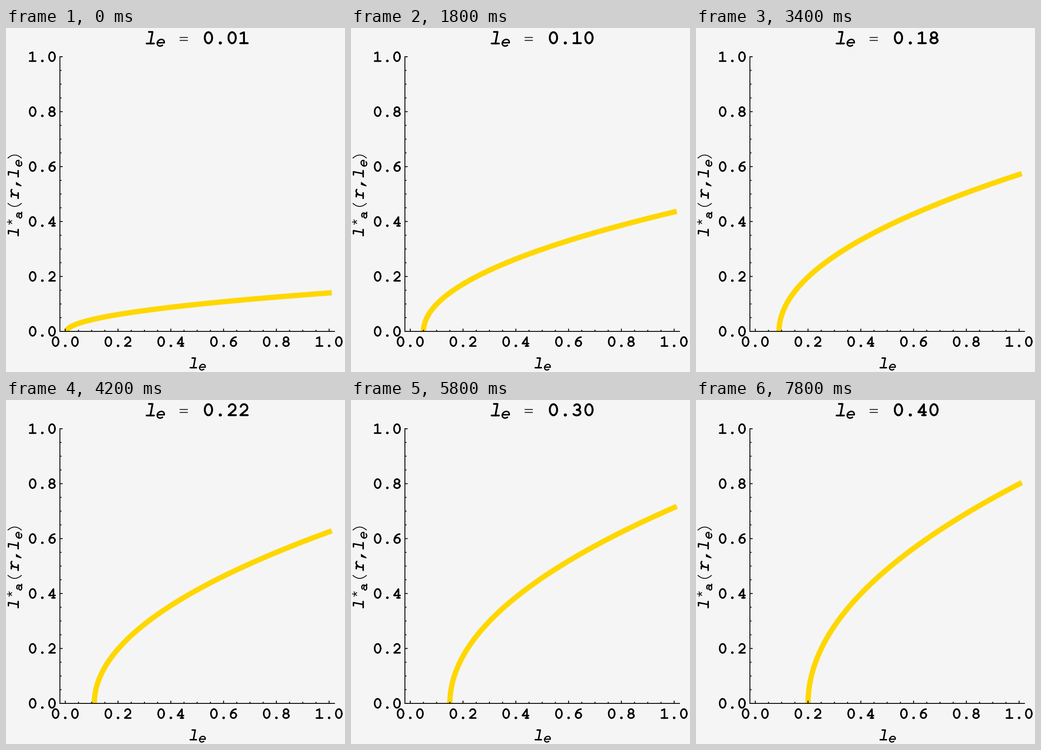
A matplotlib script that plays this animation: 742x754 px, repeating every 8 s.

```python
import numpy as np
import matplotlib.pyplot as plt
from matplotlib.animation import FuncAnimation
from matplotlib.patches import Polygon

W, H, DPI = 742, 754, 100
PT = 72 / DPI
FRAMES, INTERVAL = 40, 200
X0, XS = 129.7, 577.6
Y0, YS = 665.0, 602.0
AXIS_X = 118
CURVE_Y0 = 665.6
R_MAX = 1.01
BG, GOLD = "#f5f5f5", "#ffd700"
GAP = [(np.nan, np.nan)]

fig = plt.figure(figsize=(W / DPI, H / DPI), dpi=DPI, facecolor=BG)
ax = fig.add_axes([0, 0, 1, 1])
ax.set_xlim(0, W)
ax.set_ylim(H, 0)
ax.axis("off")


def line(xs, ys, width=1.9, cap="butt", color="black", z=3):
    return ax.plot(xs, ys, color=color, lw=width * PT, solid_capstyle=cap,
                   solid_joinstyle="round", snap=False, zorder=z)[0]


def arc(cx, cy, rx, ry, start=0, end=360):
    t = np.radians(np.linspace(start, end, 48))
    return list(zip(cx + rx * np.cos(t), cy + ry * np.sin(t)))


# Pen strokes of the digits, in em, centred on x = 0 above the baseline.
SIX = arc(0.01, 0.215, 0.175, 0.17) + GAP + arc(0.17, 0.215, 0.335, 0.385, 90, 180)
DIGITS = {
    "0": arc(0, 0.325, 0.185, 0.28),
    "1": [(-0.17, 0.53), (0, 0.6), (0, 0.05)] + GAP + [(-0.19, 0.05), (0.19, 0.05)],
    "2": arc(0, 0.43, 0.17, 0.175, 165, -35) + [(-0.18, 0.05), (0.19, 0.05)],
    "3": arc(-0.01, 0.46, 0.155, 0.14, 150, -90) + arc(-0.02, 0.18, 0.19, 0.14, 90, -150),
    "4": [(0.09, 0.05), (0.09, 0.6), (-0.19, 0.2), (0.19, 0.2)]
         + GAP + [(0, 0.05), (0.18, 0.05)],
    "5": [(0.15, 0.6), (-0.14, 0.6), (-0.14, 0.34)]
         + arc(-0.01, 0.225, 0.19, 0.18, 130, -145),
    "6": SIX,
    "7": [(-0.17, 0.5), (-0.17, 0.6), (0.17, 0.6), (0.17, 0.55), (-0.02, 0.05)],
    "8": arc(0, 0.465, 0.15, 0.14) + GAP + arc(0, 0.185, 0.18, 0.14),
    "9": [(-x, 0.65 - y) for x, y in SIX],
    ".": arc(0, 0.06, 0.03, 0.03),
}


def number_strokes(text, cx, base, size):
    pts = []
    for i, ch in enumerate(text):
        shift = 0.6 * (i - (len(text) - 1) / 2)
        pts += [(x + shift, y) for x, y in DIGITS[ch]] + GAP
    u, v = np.array(pts).T
    return cx + size * u, base - size * v


def number(text, cx, base, size):
    return line(*number_strokes(text, cx, base, size), 0.097 * size, "round", z=4)


def stroke(pts, x, base, width, up=False):
    """Draw a pen stroke in text coordinates, optionally running upwards."""
    u, v = np.array(pts, float).T
    if up:
        line(base - v, x - u, width, "round")
    else:
        line(x + u, base - v, width, "round")


def letter_l(x, base, h, width, up=False):
    stem = [(0.2 * h, h), (0.52 * h, h), (0.33 * h, 0)]
    stroke([(0, 0), (0.64 * h, 0)] + GAP + stem, x, base, width, up)


def letter_e(x, base, w, h, width, up=False):
    bowl = [(u + 0.2 * (v - h / 2), v)
            for u, v in arc(w / 2, h / 2, w / 2, h / 2, 0, 312)]
    stroke(bowl + GAP + [(0, h / 2), (w, h / 2)], x, base, width, up)


def letter_a(x, base, width):
    bowl = arc(5, 3.2, 5, 3.2)
    stem = arc(6.2, 7.6, 4.8, 3.2, 150, 0) + [(9.7, 0), (12.8, 0)]
    stroke(bowl + GAP + stem, x, base, width, True)


def letter_r(x, base, width):
    t = np.linspace(0, 1, 25)
    arm = list(zip(7.5 * (1 - t) ** 2 + 28 * t * (1 - t) + 19.5 * t ** 2,
                   8.5 * (1 - t) ** 2 + 37 * t * (1 - t) + 14 * t ** 2))
    stem = [(3.5, 15), (9, 15), (6, 0)]
    stroke([(0, 0), (12, 0)] + GAP + stem + GAP + arm, x, base, width, True)


def paren(y, bulge):
    t = np.linspace(-1, 1, 40)
    line(19 + 15.3 * t, y + bulge * (1 - t ** 2), 1.8)


def draw_axes():
    line([AXIS_X, AXIS_X], [Y0 - YS - 1, Y0 + 1])
    line([AXIS_X - 1, 720], [Y0, Y0])
    for i in range(21):
        major = i % 4 == 0
        size = 6 if major else 3.5
        x, y = X0 + XS * i / 20, Y0 - YS * i / 20
        line([AXIS_X, AXIS_X + size], [y, y])
        line([x, x], [Y0, Y0 - size])
        if major:
            number(f"{i / 20:.1f}", 79.5, y + 11.3, 35.3)
            number(f"{i / 20:.1f}", x, 698.8, 35.3)


def draw_labels():
    # title
    letter_l(307.6, 34, 25.4, 3.8)
    letter_e(331.2, 39.6, 15, 14.6, 3.1)
    for y in (20.7, 27.3):
        line([380, 398], [y, y], 1.7)
    # horizontal axis
    letter_l(403.2, 744.6, 21.2, 3.2)
    letter_e(423.8, 749.6, 12.2, 12.4, 2.6)
    # vertical axis
    letter_l(455.2, 26.6, 21.2, 3.2, True)
    for k in range(5):
        a = np.pi + 2 * np.pi * k / 5
        line([8.3, 8.3 + 6 * np.cos(a)], [425.3, 425.3 + 6 * np.sin(a)], 1.7)
    letter_a(416.5, 34.4, 2.6)
    paren(384, 7)
    letter_r(373.4, 26.6, 3.2)
    ax.add_patch(Polygon([(22, 337.5), (22, 343.5), (33.5, 347), (33.5, 345)],
                         fc="black", ec="black", lw=0.5 * PT, zorder=4))
    letter_l(326.2, 26.6, 21.2, 3.2, True)
    letter_e(302.5, 34.4, 12.2, 12.4, 2.6, True)
    paren(285.5, -7)


draw_axes()
draw_labels()
curve = line([], [], 11.6, color=GOLD, z=2)
title = number("0.01", 482, 35.4, 43.2)


def update(i):
    le = (i + 1) / 100
    # la = sqrt(le (2r - le)), sampled along its height
    la = np.linspace(0, np.sqrt(le * (2 * R_MAX - le)), 300)
    r = (la ** 2 / le + le) / 2
    curve.set_data(X0 + XS * r, CURVE_Y0 - YS * la)
    title.set_data(*number_strokes(f"{le:.2f}", 482, 35.4, 43.2))
    return curve, title


anim = FuncAnimation(fig, update, frames=FRAMES, interval=INTERVAL,
                     repeat=True, repeat_delay=0, blit=False)
plt.show()
```
